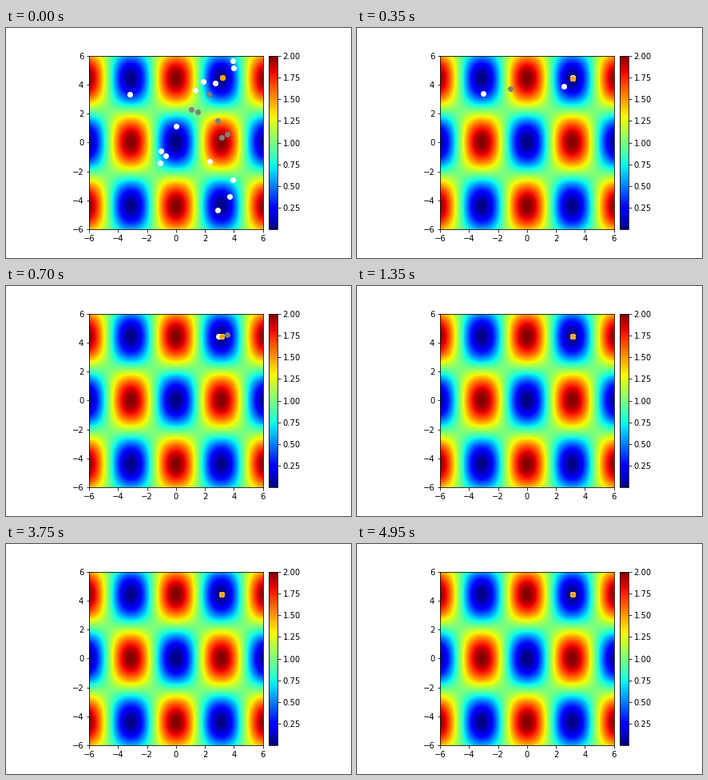
A matplotlib script for the animation above (5000 ms loop, 432x288 px).

```python
import numpy as np
import matplotlib.pyplot as plt
from matplotlib.animation import FuncAnimation
from mpl_toolkits.axes_grid1 import make_axes_locatable

FRAMES = 100
INTERVAL = 50
GOAL = np.array([np.pi, np.pi * np.sqrt(2)])

# Best positions at the start; the first few particles have already left theirs
BESTS = [(0, 1.1), (-0.7, -0.95), (-1.1, -1.4), (3.7, -3.75), (2.85, -4.7),
         (3.9, -2.6), (-1.05, -0.6), (1.35, 3.6), (1.9, 4.2), (2.7, 4.1),
         (3.9, 5.65), (4, 5.15), (3.2, 4.5), (2.35, -1.3), (-3.2, 3.35)]
MOVED = [(2.25, 3.3), (1.5, 2.1), (1.05, 2.3), (3.15, 0.35), (3.55, 0.55),
         (2.9, 1.5)]


def griewank(x, y):
    return 1 + (x**2 + y**2) / 4000 - np.cos(x) * np.cos(y / np.sqrt(2))


def swing_path(start, turn, life):
    """Swing around the goal, dying out after about `life` frames."""
    n = np.arange(FRAMES)[:, None]
    swing = np.cos(n * turn) * np.exp(-(n / life)**8)
    return GOAL + swing * (start - GOAL)


def running_best(first, path):
    best = np.empty_like(path)
    current = first
    for n, point in enumerate(path):
        if griewank(*point) < griewank(*current):
            current = point
        best[n] = current
    return best


def build_swarm():
    rng = np.random.default_rng(4)
    first = np.array(BESTS, dtype=float)
    start = first.copy()
    start[:len(MOVED)] = MOVED
    turns = rng.uniform(0.2, 0.5, start.shape)
    lives = rng.uniform(3, 6, len(start))
    # The last two particles arrive late
    turns[-2:] = (0.1, 0.21), (0.118, 0.118)
    lives[-2:] = 10, 17
    paths = [swing_path(*args) for args in zip(start, turns, lives)]
    bests = [running_best(*args) for args in zip(first, paths)]
    return np.array(paths), np.array(bests)


positions, bests = build_swarm()
leaders = griewank(bests[..., 0], bests[..., 1]).argmin(axis=0)

fig, ax = plt.subplots(figsize=(6, 4), dpi=72, facecolor="white")
fig.subplots_adjust(left=0.125, right=0.9025, bottom=0.125, top=0.88)

axis = np.linspace(-6, 6, 100)
image = ax.imshow(griewank(*np.meshgrid(axis, axis)), cmap="jet",
                  origin="lower", extent=(-6, 6, -6, 6))
ax.set_xticks(range(-6, 7, 2))
ax.set_yticks(range(-6, 7, 2))
cax = make_axes_locatable(ax).append_axes("right", size="5%", pad=0.1)
fig.colorbar(image, cax=cax, ticks=np.arange(0.25, 2.01, 0.25))


def dots(color, order):
    return ax.plot([], [], "o", color=color, ms=6, mew=1, zorder=order)[0]


current_dots = dots("gray", 2.1)
best_dots = dots("white", 2.2)
leader_dot = dots("orange", 2.3)


def update(n):
    current_dots.set_data(*positions[:, n].T)
    best_dots.set_data(*bests[:, n].T)
    leader_dot.set_data(*bests[leaders[n], n][:, None])
    return current_dots, best_dots, leader_dot


anim = FuncAnimation(fig, update, frames=FRAMES, interval=INTERVAL, repeat=True)
plt.show()
```
